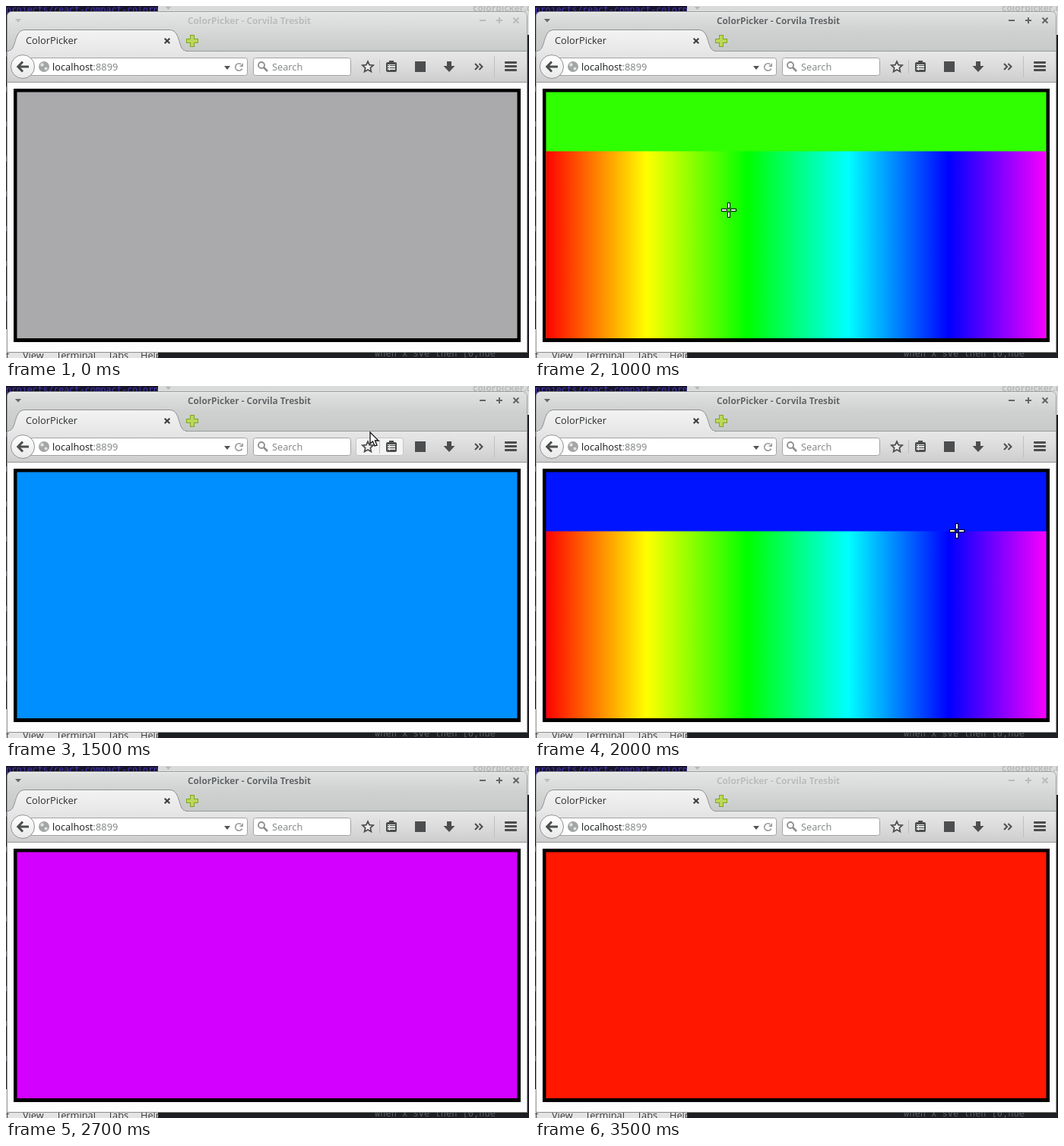
These frames come from a looping animation (688x464 px, 3.6 s). An HTML page with a canvas:

```html
<!DOCTYPE html>
<html lang="en">
<head>
<meta charset="utf-8">
<title>ColorPicker</title>
<style>
  html, body { margin: 0; width: 100%; height: 100%; overflow: hidden; background: #fff; }
  canvas { display: block; }
</style>
</head>
<body>
<canvas id="stage" width="688" height="464"></canvas>
<script>
const ctx = document.getElementById('stage').getContext('2d');
const STEP = 100, STEPS = 36;
const SANS = '"Open Sans", "Noto Sans", sans-serif';
const MONO = '"DejaVu Sans Mono", monospace';
const UI = '12.8px ' + SANS;
const INK = '#4b4d4e';
const BOX = { x: 14.5, y: 113.5, w: 658, h: 324.5, split: 191.5 };
const HUES = { x: 14, w: 663, span: 300 };

// Pointer stops: in from the left, out at the top, out at the right, back out to the left
const STOPS = [
  { n: 0, x: -200, y: 240 }, { n: 5, x: 6, y: 250 }, { n: 6, x: 120, y: 255 },
  { n: 9, x: 255, y: 269 }, { n: 10, x: 255, y: 269 }, { n: 14, x: 470, y: 135 },
  { n: 15, x: 479, y: 61 }, { n: 17, x: 492, y: 72 }, { n: 22, x: 597, y: 270 },
  { n: 23, x: 645, y: 306 }, { n: 24, x: 654, y: 320 }, { n: 26, x: 720, y: 340 },
  { n: 28, x: 720, y: 340 }, { n: 32, x: 26, y: 290 }, { n: 36, x: -200, y: 280 }
];

function pointer(n) {
  const i = Math.max(1, STOPS.findIndex(s => s.n >= n));
  const a = STOPS[i - 1], b = STOPS[i], k = (n - a.n) / (b.n - a.n);
  return { x: Math.round(a.x + (b.x - a.x) * k), y: Math.round(a.y + (b.y - a.y) * k) };
}

const inside = p => p.x >= 10 && p.x < 677 && p.y >= 109 && p.y < 443;
const hsl = hue => `hsl(${hue}, 100%, 50%)`;

// The picked colour follows the pointer one step late and stays after it leaves.
function picked(n) {
  for (let m = n - 1; m >= 0; m--) {
    const p = pointer(m);
    if (inside(p)) return hsl((p.x - HUES.x) / HUES.w * HUES.span);
  }
  return '#aaaaad';
}

function rect(x, y, w, h, fill) {
  ctx.fillStyle = fill;
  ctx.fillRect(x, y, w, h);
}

function ramp(x0, y0, x1, y1, colors) {
  const g = ctx.createLinearGradient(x0, y0, x1, y1);
  colors.forEach((c, i) => g.addColorStop(i / (colors.length - 1), c));
  return g;
}

function text(s, x, y, font, color) {
  ctx.font = font;
  ctx.fillStyle = color;
  ctx.fillText(s, x, y);
}

function paint(fill, stroke, width = 1) {
  if (fill) { ctx.fillStyle = fill; ctx.fill(); }
  if (stroke) { ctx.strokeStyle = stroke; ctx.lineWidth = width; ctx.stroke(); }
}

function poly(points, fill, stroke, width) {
  ctx.beginPath();
  points.forEach(([x, y]) => ctx.lineTo(x, y));
  ctx.closePath();
  paint(fill, stroke, width);
}

function round(x, y, w, h, r, fill, stroke) {
  ctx.beginPath();
  ctx.roundRect(x, y, w, h, r);
  paint(fill, stroke);
}

function circle(x, y, r, fill, stroke, width) {
  ctx.beginPath();
  ctx.arc(x, y, r, 0, 7);
  paint(fill, stroke, width);
}

function line(points, color, width) {
  ctx.beginPath();
  points.forEach(([x, y]) => ctx.lineTo(x, y));
  paint(null, color, width);
}

function cross(x, y, r, color, width) {
  line([[x - r, y - r], [x + r, y + r]], color, width);
  line([[x + r, y - r], [x - r, y + r]], color, width);
}

function plus(x, y, r, t, fill) {
  rect(x - r, y - t, 2 * r, 2 * t, fill);
  rect(x - t, y - r, 2 * t, 2 * r, fill);
}

// Triangle pointing down
const caret = (x, y, r, h, fill) => poly([[x - r, y], [x + r, y], [x, y + h]], fill);

function desktop() {
  rect(0, 0, 688, 464, '#1d1f26');
  rect(0, 0, 200, 8, '#17142a');
  text('projects/react-compact-colorp', 0, 9, '11.5px ' + MONO, '#4437b5');
  rect(200, 0, 488, 38, '#d9dbda');
  caret(213.5, 1, 3.5, 4, '#b4b6b5');
  text('colorpicker.c', 614, 7, 'bold 12px ' + SANS, '#b9bbba');
  for (let y = 60; y < 420; y += 46) rect(0, y, 1, 7, '#62656d');
  rect(0, 426, 200, 38, '#e4e4e4');
  text('t', 0, 465, UI, '#3c3c3c');
  text('View', 22, 465, UI, '#3c3c3c');
  text('Terminal', 66, 465, UI, '#3c3c3c');
  text('Tabs', 134, 465, UI, '#3c3c3c');
  text('Help', 177, 465, UI, '#3c3c3c');
  rect(200, 457, 488, 7, '#1d1f22');
  text('when x sve then [0,hue', 485, 462, '12px ' + MONO, '#5c6064');
}

function titleBar(active) {
  const top = active ? ['#e0e2e1', '#cfd1d0', '#c7cac8'] : ['#e4e5e5', '#d6d8d7', '#c8cbc9'];
  const ink = active ? '#626567' : '#b9bcbb';
  const title = 'ColorPicker - Corvila Tresbit', font = 'bold 11.8px ' + SANS;
  round(1.5, 7.5, 684, 455, [6, 6, 0, 0], '#c8cbc9', '#9a9d9c');
  round(2, 8, 683, 52, [5, 5, 0, 0], ramp(0, 8, 0, 60, top));
  rect(7, 8, 673, 1, '#f1f2f1');
  text(title, 239, 25, font, '#e7e9e8');
  text(title, 239, 24, font, ink);
  caret(16, 17, 4, 4.5, ink);
  rect(623, 18, 8, 2, ink);
  plus(649, 19, 4, 1, ink);
  cross(671, 19, 3.5, ink, 2);
}

function tabs() {
  rect(2, 60, 683, 40, ramp(0, 60, 0, 100, ['#e7e7e7', '#dcdcdc', '#cdcdcd']));
  rect(2, 59, 683, 1, '#969998');
  ctx.beginPath();
  ctx.moveTo(2, 59.5);
  ctx.bezierCurveTo(15, 59.5, 9, 31.5, 25, 31.5);
  ctx.lineTo(215, 31.5);
  ctx.bezierCurveTo(231, 31.5, 225, 59.5, 238, 59.5);
  paint(ramp(0, 31, 0, 60, ['#f3f3f3', '#e7e7e7']), '#8d908f');
  rect(4, 59, 232, 1, '#e7e7e7');
  text('ColorPicker', 26, 50, UI, '#2d2f30');
  cross(212, 46, 3.3, '#404243', 2.2);
  plus(245, 46, 8, 3, '#7fa52a');
  plus(245, 46, 7, 2, '#bcd858');
}

function addressBar() {
  round(29.5, 68.5, 288, 23, 3, '#fff', '#a3a3a3');
  circle(22, 80, 15.5, ramp(0, 64, 0, 96, ['#fff', '#e8e8e8']), '#929292');
  line([[30, 80], [17, 80]], INK, 3);
  line([[22, 73.5], [15.8, 80], [22, 86.5]], INK, 3);

  circle(50, 80, 7, '#a3a5a6');
  circle(47.5, 77.5, 2.2, '#e1e2e2');
  circle(52.5, 82.5, 2, '#e1e2e2');

  text('localhost', 61, 85, UI, '#17191a');
  text(':8899', 61 + ctx.measureText('localhost').width, 85, UI, '#7d8081');
  caret(291, 79, 4, 5, '#515354');

  ctx.beginPath();
  ctx.arc(306.5, 80.5, 4.7, 0.5, 5.3);
  paint(null, '#9b9d9e', 1.8);
  poly([[312, 75], [312, 80], [307, 80]], '#9b9d9e');

  round(325.5, 68.5, 128, 23, 3, '#fff', '#a3a3a3');
  circle(336, 78, 4, null, '#8c8e8f', 1.8);
  line([[339, 81], [344, 86]], '#8c8e8f', 2.6);
  text('Search', 350, 85, UI, '#818485');
}

function toolbarIcons(hover) {
  if (hover) round(460.5, 68.5, 62, 23, 3, '#f4f4f4', '#c5c5c5');
  const star = Array.from({ length: 10 }, (_, i) => {
    const a = i * Math.PI / 5 - Math.PI / 2, r = i % 2 ? 3.5 : 7.5;
    return [476 + r * Math.cos(a), 80.5 + r * Math.sin(a)];
  });
  poly(star, '#eee', INK, 1.7);
  rect(491, 71, 1, 18, '#bfbfbf');

  round(500, 74, 14, 13, 2, INK);
  rect(504, 72, 6, 3, INK);
  rect(502, 77, 10, 8, '#e4e4e4');
  for (let y = 78; y < 85; y += 3) {
    rect(502, y, 2, 1, INK);
    rect(505, y, 7, 1, INK);
  }

  rect(538, 73, 14, 14, INK);

  rect(580, 73, 6, 7, INK);
  caret(583, 79, 7.5, 8, INK);
  for (const x of [617, 622.5]) line([[x, 76], [x + 4, 80], [x, 84]], INK, 2);
  rect(642, 66, 1, 28, '#c0c0c0');
  for (let y = 73; y < 86; y += 5) round(656, y, 16, 3, 1, INK);
}

function page(n, open) {
  rect(2, 100, 683, 1, '#969696');
  rect(2, 101, 683, 355, '#fdfdfd');
  rect(1, 456, 685, 1, '#8c8f8e');
  rect(10, 109, 667, 334, '#000');
  rect(BOX.x, BOX.y, BOX.w, BOX.h, picked(n));
  if (!open) return;
  const rainbow = Array.from({ length: 6 }, (_, i) => hsl(i * 60));
  rect(BOX.x, BOX.split, BOX.w, BOX.y + BOX.h - BOX.split,
    ramp(HUES.x, 0, HUES.x + HUES.w, 0, rainbow));
}

function crosshair({ x, y }) {
  ctx.save();
  ctx.translate(x, y);
  for (let i = 0; i < 4; i++) {
    rect(2, -2, 8, 4, '#000');
    rect(3, -1, 6, 2, '#fff');
    ctx.rotate(Math.PI / 2);
  }
  ctx.restore();
}

function arrow({ x, y }) {
  const shape = [[0, 0], [0, 15], [3.5, 12], [6, 18], [9, 17], [6.5, 11], [11, 11]];
  poly(shape.map(([dx, dy]) => [x + dx, y + dy]), '#fff', '#111', 1.3);
}

function draw(n) {
  const p = pointer(n), open = inside(p);
  const hover = p.x >= 460 && p.x < 523 && p.y >= 60 && p.y < 100;
  desktop();
  // The window ends above the bottom strip of the desktop.
  ctx.save();
  ctx.beginPath();
  ctx.rect(0, 0, 688, 457);
  ctx.clip();
  titleBar(n >= 7 && n < 35);
  tabs();
  addressBar();
  toolbarIcons(hover);
  page(n, open);
  ctx.restore();
  if (open) crosshair(p);
  else arrow(p);
}

const start = performance.now();
function tick() {
  draw(Math.floor((performance.now() - start) / STEP) % STEPS);
  requestAnimationFrame(tick);
}
tick();
</script>
</body>
</html>
```
